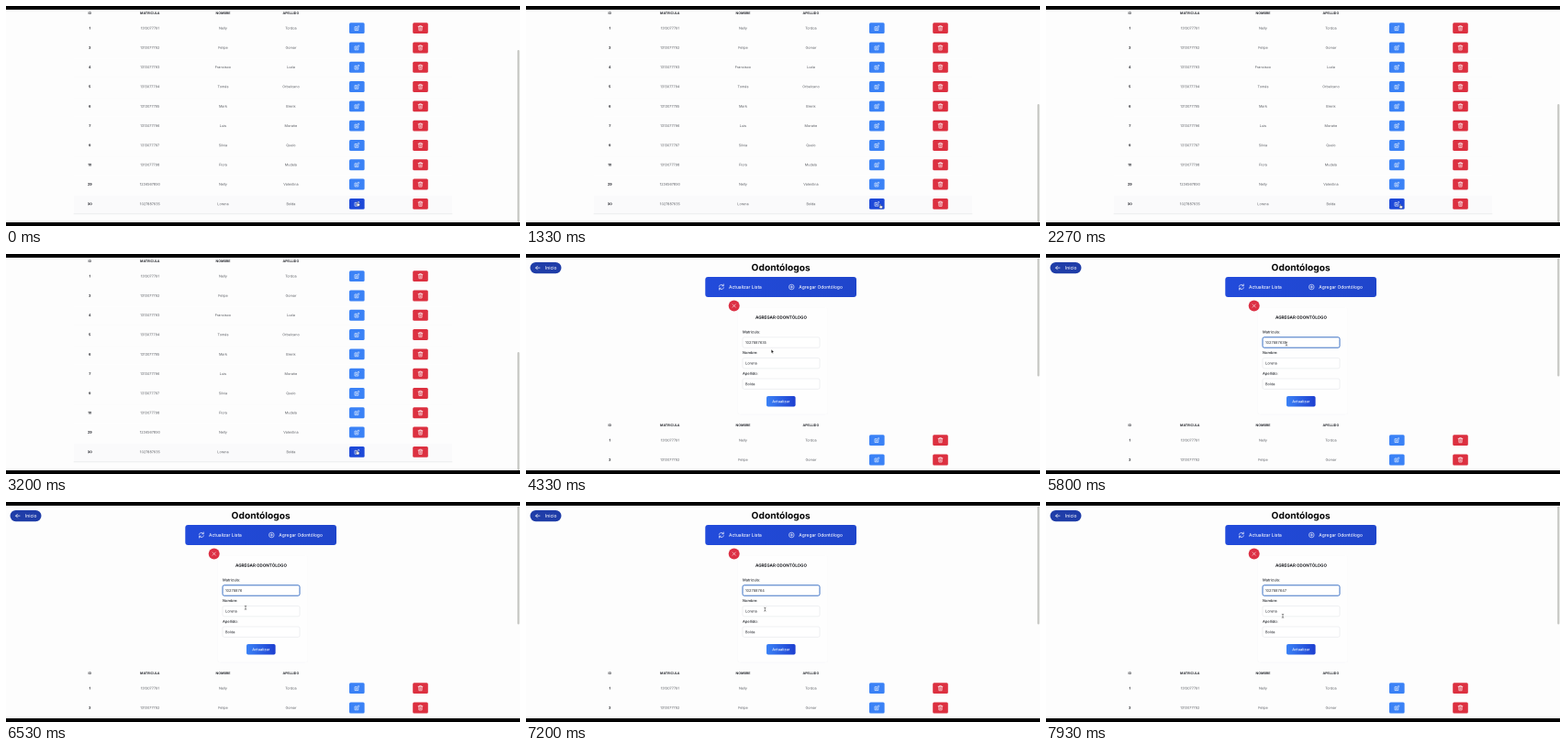
Write an HTML page that moves like this. It is 560 px wide and 240 px high and loops after 8 s.

```html
<!DOCTYPE html>
<html lang="es">
<head>
<meta charset="utf-8">
<title>Odontólogos</title>
<style>
  html, body { margin: 0; width: 100%; height: 100%; overflow: hidden; background: #000; }
  svg { display: block; width: 560px; height: 240px; }
  text { font-family: Inter, "Open Sans", sans-serif; text-rendering: geometricPrecision; }
</style>
</head>
<body>
<svg id="stage" viewBox="0 0 560 240" xmlns="http://www.w3.org/2000/svg">
  <defs>
    <linearGradient id="bar"><stop stop-color="#224bdb"/><stop offset="1" stop-color="#1f45cb"/></linearGradient>
    <linearGradient id="btn"><stop stop-color="#3b82f6"/><stop offset="1" stop-color="#1d3fd0"/></linearGradient>
    <clipPath id="view"><rect y="4" width="560" height="232"/></clipPath>
    <g id="edit" fill="none" stroke="#fff" stroke-width=".6" stroke-linecap="round" stroke-linejoin="round">
      <path d="M-.2-1.4H-2.2V2.4H1.6V.5M-.7.9L-.5-.2 1.9-2.6 2.8-1.7.4.7Z"/>
    </g>
    <g id="trash" fill="none" stroke="#fff" stroke-width=".6" stroke-linecap="round" stroke-linejoin="round">
      <path d="M-2.4-1.7H2.4M-.9-1.7V-2.6H.9V-1.7M-1.8-1.7L-1.6 2.6H1.6L1.8-1.7M-.5-.4V1.4M.5-.4V1.4"/>
    </g>
  </defs>
  <g clip-path="url(#view)">
    <rect width="560" height="240" fill="#fdfdfd"/>
    <g id="page"></g>
    <rect id="thumb" x="557.2" width="2.2" rx="1.1" fill="#c6c7c3"/>
    <g id="cursor"></g>
  </g>
</svg>
<script>
const LOOP = 8000, BOTTOM = 179, OPEN = 600;
const SCROLL = [3530, 3950];
const $ = id => document.getElementById(id);
const NS = 'http://www.w3.org/2000/svg';

function add(parent, tag, attrs, content) {
  const el = document.createElementNS(NS, tag);
  for (const k in attrs) el.setAttribute(k, attrs[k]);
  if (content !== undefined) el.textContent = content;
  return parent.appendChild(el);
}
const page = $('page');
const box = (x, y, w, h, rx, fill) =>
  add(page, 'rect', { x, y, width: w, height: h, rx, fill });
// The tiny rotation turns off glyph hinting, so small letters keep their shape
const label = (s, x, y, size, fill, weight = 400, anchor = 'start') =>
  add(page, 'text', {
    x, y: y + size * .36, 'font-size': size, fill, 'font-weight': weight,
    'text-anchor': anchor, transform: `rotate(.05 ${x} ${y})`
  }, s);
const line = (d, stroke, width) =>
  add(page, 'path', { d, stroke, 'stroke-width': width, fill: 'none', 'stroke-linecap': 'round', 'stroke-linejoin': 'round' });
const icon = (id, x, y) => add(page, 'use', { href: '#' + id, x, y });

// Page header
label('Odontólogos', 277.7, 14.7, 10.2, '#060606', 700, 'middle');
box(4.5, 9, 34, 12.2, 6.1, '#1f3da8');
line('M15 15.1H10.7M12.5 13.2L10.6 15.1 12.5 17', '#fff', .7);
label('Inicio', 21, 15.1, 4.9, '#fff', 500);
box(195.3, 25, 164.7, 22, 3, 'url(#bar)');
line('M210.4 35.3A2.6 2.6 0 0 1 215 34.5M215.3 33V34.8H213.5M215.4 36.7A2.6 2.6 0 0 1 210.8 37.5M210.5 39V37.2H212.3', '#fff', .65);
label('Actualizar Lista', 221, 36, 4.9, '#fff', 500);
add(page, 'circle', { cx: 289.3, cy: 36, r: 2.8, fill: 'none', stroke: '#fff', 'stroke-width': .6 });
line('M288 36H290.6M289.3 34.7V37.3', '#fff', .6);
label('Agregar Odontólogo', 297.3, 36, 4.9, '#fff', 500);

// Form
box(230.5, 58.5, 98.5, 117, 2.5, '#fafafb');
box(231, 58.5, 97.5, 116, 2.5, '#fefefe');
add(page, 'circle', { cx: 226.7, cy: 56.5, r: 6, fill: '#dc3045' });
line('M225.1 54.9L228.3 58.1M228.3 54.9L225.1 58.1', '#fff', .6);
label('AGREGAR ODONTÓLOGO', 278, 69.2, 4.55, '#15171c', 700, 'middle');
const fields = [['Matricula:', '1027887635'], ['Nombre:', 'Lorena'], ['Apellido:', 'Bolda']].map(([name, value], i) => {
  const y = 90.8 + i * 22.6;
  label(name, 236, y - 5.8, 4, '#1d2026', 500);
  const frame = box(236, y, 84, 11.4, 1.8, '#fff');
  return { y, frame, text: label(value, 239, y + 5.8, 3.95, '#22252b') };
});
box(262, 155, 31.6, 11.6, 1.8, 'url(#btn)');
label('Actualizar', 277.8, 160.8, 4, '#fff', 500, 'middle');

// Table
const people = [
  [1, 1313077791, 'Nelly', 'Tordoa'],
  [3, 1313077792, 'Felipe', 'Gomar'],
  [4, 1313077793, 'Francisco', 'Luda'],
  [5, 1313077794, 'Tomás', 'Orbelcano'],
  [6, 1313077795, 'Mark', 'Brenk'],
  [7, 1313077796, 'Luis', 'Morañe'],
  [9, 1313077797, 'Silvia', 'Quelo'],
  [10, 1313077798, 'Flora', 'Mudela'],
  [29, 1234567890, 'Nelly', 'Valentina'],
  [30, 1027887635, 'Lorena', 'Bolda']
];
const cols = [91.3, 156.8, 236.5, 310.4];
['ID', 'MATRICULA', 'NOMBRE', 'APELLIDO'].forEach((s, i) =>
  label(s, cols[i], 186.8, 3.6, '#2a2c32', 700, 'middle'));
const rows = people.map((cells, i) => {
  const y = 203.1 + i * 21.3;
  const back = box(74, y - 9, 412, 20, 0, '#fdfdfd');
  cells.forEach((s, c) => label(s, cols[c], y, 3.75, c ? '#585b61' : '#24262c', c ? 400 : 700, 'middle'));
  const button = box(374, y - 5.9, 16.6, 11.9, 1.5, '#3b82f6');
  icon('edit', 382.2, y);
  box(443.2, y - 5.9, 16.6, 11.9, 1.5, '#dc3040');
  icon('trash', 451.5, y);
  return { y, back, button };
});
line('M74 405.8H486', '#e4e5e7', .7);

// Pointer shapes, drawn around their hot spot
const outline = { 'stroke-linejoin': 'round', 'stroke-linecap': 'round' };
const shapes = {
  arrow: { d: 'M0 0V3.7L.9 2.9 1.5 4.2 2.1 3.9 1.5 2.7H2.7Z', fill: '#111', stroke: '#fff', 'stroke-width': .25 },
  hand: { d: 'M-.5-.1Q0-.7.5-.1V1.4L2.2 1.8Q2.7 2 2.5 2.8L2 4.3H-.3L-1.5 2.5Q-1.5 1.8-.5 2.3Z', fill: '#fff', stroke: '#182040', 'stroke-width': .35 },
  beam: { d: 'M-.8-2Q0-2 0-1.4Q0-2 .8-2M0-1.4V1.4M-.8 2Q0 2 0 1.4Q0 2 .8 2', fill: 'none', stroke: '#333', 'stroke-width': .5 }
};
const pointers = {};
for (const k in shapes) pointers[k] = add($('cursor'), 'path', { ...shapes[k], ...outline });

const track = [
  [0, 383, 214], [600, 383, 214], [1300, 386, 216.5], [2400, 386, 216.5], [3150, 382.5, 214.5],
  [3500, 382, 214], [4250, 267.3, 104.3], [4400, 267.3, 104.3], [4700, 263, 118], [4850, 263, 118],
  [5130, 262, 101.3], [5350, 262, 98], [5900, 262, 98], [6450, 261, 115.3], [7000, 261, 115.3],
  [7700, 258, 124.3], [LOOP, 258, 124.3]
];
const typing = [[0, '1027887635'], [5950, '102788763'], [6200, '10278876'], [6950, '102788764'], [7300, '1027887647']];

const clamp = v => Math.max(0, Math.min(1, v));
const smooth = v => v * v * (3 - 2 * v);
function pointAt(t) {
  const i = Math.max(1, track.findIndex(k => k[0] > t));
  const a = track[i - 1], b = track[i], p = smooth(clamp((t - a[0]) / (b[0] - a[0])));
  return [a[1] + (b[1] - a[1]) * p, a[2] + (b[2] - a[2]) * p];
}

function render(t) {
  const scroll = BOTTOM * (1 - smooth(clamp((t - SCROLL[0]) / (SCROLL[1] - SCROLL[0]))));
  page.setAttribute('transform', `translate(0 ${-scroll})`);
  const open = t >= OPEN;
  $('thumb').setAttribute('y', open ? 4.5 + 102.5 * scroll / BOTTOM : 48);
  $('thumb').setAttribute('height', open ? 129 : 188);

  const [x, y] = pointAt(t), py = y + scroll;
  let shape = 'arrow';
  rows.forEach(r => {
    const inRow = x > 74 && x < 486 && py > r.y - 10 && py < r.y + 11;
    const onButton = inRow && x > 374 && x < 390.6 && Math.abs(py - r.y) < 6;
    r.back.setAttribute('fill', inRow ? '#fafafb' : '#fdfdfd');
    r.button.setAttribute('fill', onButton ? '#1d49d8' : '#3b82f6');
    if (onButton) shape = 'hand';
  });

  const focus = t < 4750 ? -1 : t < 5400 ? 1 : 0;
  fields.forEach((f, i) => {
    f.frame.setAttribute('stroke', i === focus ? '#3a70c4' : '#e4e6ea');
    f.frame.setAttribute('stroke-width', i === focus ? 1 : .6);
    if (x > 236 && x < 320 && py > f.y && py < f.y + 11.4) shape = 'beam';
  });
  fields[0].text.textContent = typing.filter(k => k[0] <= t).pop()[1];

  for (const k in pointers) pointers[k].setAttribute('visibility', k === shape ? 'visible' : 'hidden');
  $('cursor').setAttribute('transform', `translate(${x} ${y})`);
}

const start = performance.now();
function tick() {
  render((performance.now() - start) % LOOP);
  requestAnimationFrame(tick);
}
tick();
</script>
</body>
</html>
```
